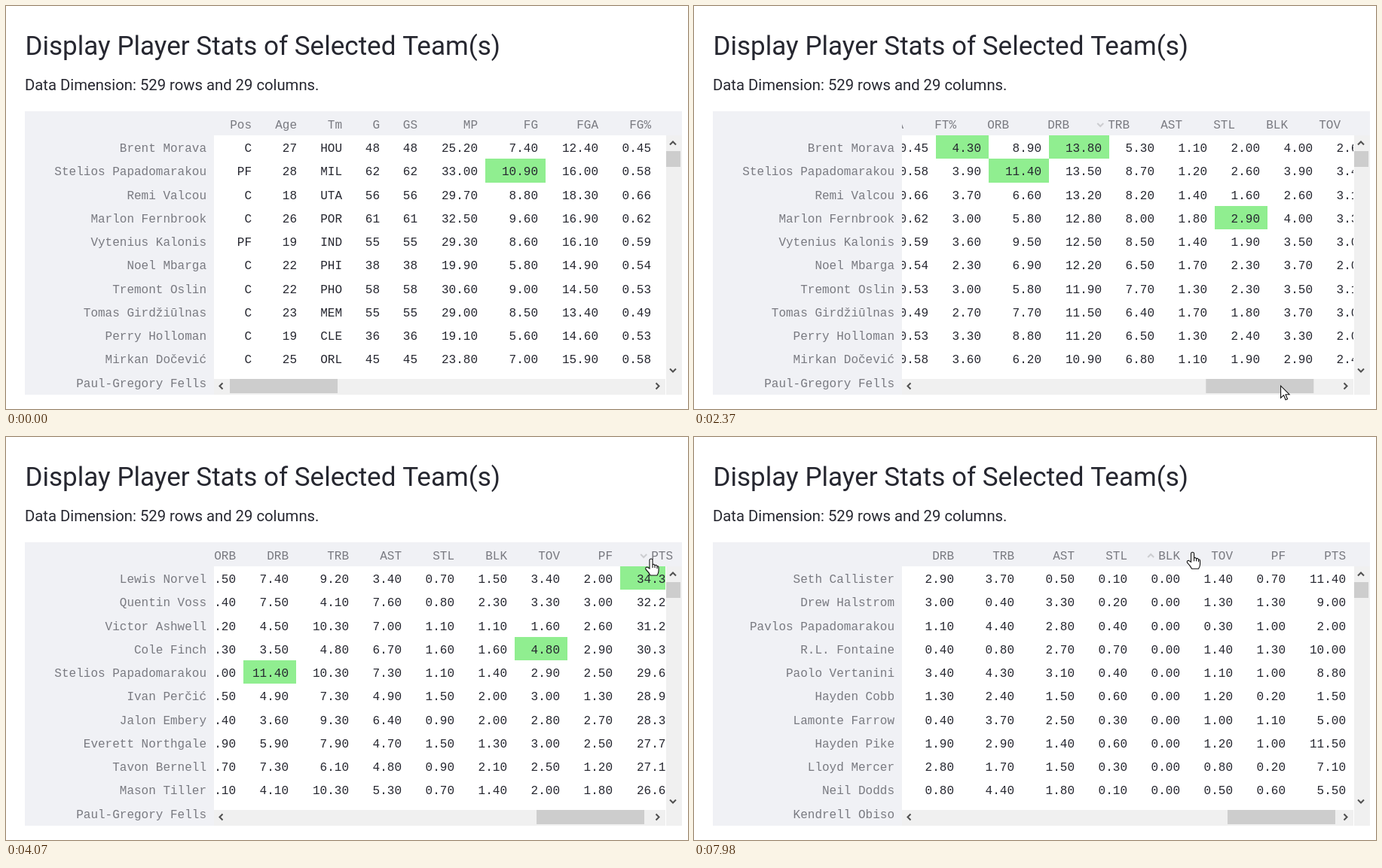
Animation of 905 by 536 pixels, one loop 8000 ms. Source, as an HTML page with a canvas:

```html
<!DOCTYPE html>
<html lang="en">
<head>
<meta charset="utf-8">
<title>Player stats</title>
<style>
html, body { margin: 0; width: 100%; height: 100%; overflow: hidden; background: #fff; }
canvas { display: block; }
</style>
</head>
<body>
<canvas id="stage" width="905" height="536"></canvas>
<script>
const ctx = document.getElementById('stage').getContext('2d');
const LOOP = 8000, LEFT = 276, TOP = 172, ROW = 31.25, ROWS = 10, MAX_SCROLL = 1391;
const MONO = '16px "Liberation Mono", monospace';
const SANS = 'Roboto, sans-serif';
const INK = '#262730', MUTED = '#797a81', PANEL = '#f0f1f5', BAR = '#f0f0f0', THUMB = '#cdcdcd', GREEN = '#90ee90';

const noise = n => Math.abs(Math.sin(n * 12.9898) * 43758.5453) % 1;

// League best per column; the percentages share one value
const best = {
  Age: 33, G: 70, GS: 70, MP: 37, FG: 10.9, FGA: 22, '3P': 4, '3PA': 9, '2P': 9, '2PA': 17, FT: 9, FTA: 11,
  ORB: 4.3, DRB: 11.4, TRB: 13.8, AST: 10, STL: 2, BLK: 2.9, TOV: 4.8, PF: 3.8, PTS: 34.3
};
const labels = {
  Pos: 'C PF C C PF C C C C C'.split(' '),
  Tm: 'HOU MIL UTA POR IND PHI PHO MEM CLE ORL'.split(' ')
};

function format(name, share) {
  if (name.endsWith('%')) return (share * .8).toFixed(2);
  const value = best[name] * share;
  return /^(Age|G|GS)$/.test(name) ? value.toFixed(0) : value.toFixed(1) + '0';
}

function columnWidth(name, wide) {
  if (/^(Pos|Age|Tm)$/.test(name)) return 60;
  if (/^GS?$/.test(name)) return 50;
  return wide.split(' ').includes(name) ? 80 : 70;
}

// low..high: usual share of the league best; from..to: shares of the sorted column;
// peaks: the row in which a column holds the league best
function table({ start, cols, wide, sortBy, dir, low, high, from, to, bend = 1, peaks = {}, names }) {
  let right = start;
  return {
    sortBy, dir, names: names.split(','),
    cols: cols.split(' ').map(name => {
      const width = columnWidth(name, wide);
      right += width;
      const cells = Array.from({ length: ROWS }, (_, r) => {
        if (labels[name]) return labels[name][r];
        if (peaks[name] === r) return format(name, 1);
        if (name === sortBy) return format(name, from + (to - from) * (r / (ROWS - 1)) ** bend);
        return format(name, low + (high - low) * noise(r * 31 + name.charCodeAt(0) + name.charCodeAt(2) % 7 * 3 || r * 31 + 5));
      });
      return { name, right, width, cells, peak: peaks[name] };
    })
  };
}

const LATE = 'DRB TRB AST STL BLK TOV PF PTS';

const byRebounds = table({
  start: LEFT, wide: 'MP FG FGA 3PA 2PA FT FTA DRB TRB PTS', sortBy: 'TRB', dir: 1,
  cols: 'Pos Age Tm G GS MP FG FGA FG% 3P 3PA 3P% 2P 2PA 2P% eFG% FT FTA FT% ORB ' + LATE,
  low: .5, high: .9, from: 1, to: .79, peaks: { FG: 1, ORB: 0, DRB: 1, TRB: 0, BLK: 3 },
  names: 'Brent Morava,Stelios Papadomarakou,Remi Valcou,Marlon Fernbrook,Vytenius Kalonis,Noel Mbarga,' +
    'Tremont Oslin,Tomas Girdžiūlnas,Perry Holloman,Mirkan Dočević,Paul-Gregory Fells'
});

const pointsUp = table({
  start: 285, cols: LATE, wide: 'DRB TRB PTS', sortBy: 'PTS', dir: -1,
  low: 0, high: .12, from: 0, to: .02, bend: 3,
  names: 'Lamonte Farrow,Caleb Orton,Raymond Tisdel,Clayton Rudd,T.R. Dalena,Elijah Munn,' +
    'Oscar Jorgelin,Sam Brindle,Kurt Feeley,Devon Cutler,Rohan Whitlocke'
});

const pointsDown = table({
  start: 245, cols: 'ORB ' + LATE, wide: 'TRB PTS', sortBy: 'PTS', dir: 1,
  low: .3, high: .8, from: 1, to: .776, bend: .6, peaks: { DRB: 4, TOV: 3, PTS: 0 },
  names: 'Lewis Norvel,Quentin Voss,Victor Ashwell,Cole Finch,Stelios Papadomarakou,Ivan Perčić,' +
    'Jalon Embery,Everett Northgale,Tavon Bernell,Mason Tiller,Paul-Gregory Fells'
});

const byBlocks = table({
  start: 285, cols: LATE, wide: 'TRB AST PTS', sortBy: 'BLK', dir: -1,
  low: .03, high: .35, from: 0, to: 0,
  names: 'Seth Callister,Drew Halstrom,Pavlos Papadomarakou,R.L. Fontaine,Paolo Vertanini,Hayden Cobb,' +
    'Lamonte Farrow,Hayden Pike,Lloyd Mercer,Neil Dodds,Kendrell Obiso'
});

// Pointer path: time x y
const path = (
  '0 703 540, 130 703 540, 200 703 527, 400 703 527, 740 809 501, 940 809 501, 1420 667 507, 1620 667 507, ' +
  '1780 775 507, 2440 779 505, 2800 845 400, 3050 862 122, 3390 856 162, 4270 856 162, 4520 790 426, ' +
  '4780 657 300, 5040 741 122, 5180 569 145, 5870 461 150, 6200 330 232, 6500 221 191, 6700 326 194, ' +
  '7510 717 163, 7700 640 156, 8000 663 153'
).split(', ').map(k => k.split(' ').map(Number));

// Mouse button held down
const clicks = [[1750, 2250], [3390, 3450], [3840, 3940], [7700, 7780]];

const arrow = new Path2D('M0 0V16L4 12.5L6.5 18.5L9 17.5L6.5 11.5H11.5Z');
const hand = new Path2D('M-2 13V2Q-2 0 0 0T2 2V8Q4 6 5 9Q7 7 8 10Q10 9 10 12V16Q10 19 8 22H-1Q-3 18 -7 14Q-8 11 -5 11Z' +
  'M2 8V12M5 9V12M8 10V13');

function pointerAt(t) {
  const i = path.findIndex(k => k[0] > t);
  const [t0, x0, y0] = path[i - 1], [t1, x1, y1] = path[i];
  const p = (t - t0) / (t1 - t0);
  return [x0 + (x1 - x0) * p, y0 + (y1 - y0) * p];
}

// The fast scroll is shown in steps of 70 ms; headers trail the cells
function scrollAt(t, lag = 0) {
  const step = Math.floor((t - 59) / 70) * 70 + 60;
  return Math.min(MAX_SCROLL, Math.max(0, (step - lag - 1850) * 1285 / 520));
}

// Table, horizontal shift of cells and headers, and scroll thumb position
function viewAt(t) {
  if (t < 3450) {
    const s = scrollAt(t);
    return [byRebounds, -s, -scrollAt(t, 15), 297 + s / 3.361];
  }
  if (t < 4000) return [pointsUp, 0, 0, 711];
  if (t < 4070) return [pointsDown, -20, -20, 711];
  if (t < 7790) return [pointsDown, 0, 0, 704];
  return [byBlocks, 0, 0, 708];
}

function box(color, x, y, w, h) {
  ctx.fillStyle = color;
  ctx.fillRect(x, y, w, h);
}

function text(str, x, y, color, font, align) {
  ctx.font = font;
  ctx.fillStyle = color;
  ctx.textAlign = align;
  ctx.fillText(str, x, y);
}

function clipped(x, y, w, h, draw) {
  ctx.save();
  ctx.beginPath();
  ctx.rect(x, y, w, h);
  ctx.clip();
  draw();
  ctx.restore();
}

// Chevron pointing along (dx, dy)
function chevron(x, y, dx, dy, color) {
  ctx.beginPath();
  ctx.moveTo(x - 2 * dx - 4 * dy, y - 2 * dy - 4 * dx);
  ctx.lineTo(x + 2 * dx, y + 2 * dy);
  ctx.lineTo(x - 2 * dx + 4 * dy, y - 2 * dy + 4 * dx);
  ctx.strokeStyle = color;
  ctx.lineWidth = 2;
  ctx.stroke();
}

function drawTable([data, shift, headShift, thumb]) {
  const rowTop = r => Math.round(TOP + ROW * r);
  box(PANEL, 25, 140, 872, 32);
  box(PANEL, 25, 140, 251, 377);

  data.names.forEach((n, r) => text(n, 266, rowTop(r) + 22, MUTED, MONO, 'right'));

  clipped(LEFT, 140, 621, 32, () => data.cols.forEach(c => {
    const x = c.right - 10 + headShift;
    text(c.name, x, 163, MUTED, MONO, 'right');
    if (c.name === data.sortBy) chevron(x - c.name.length * 9.6 - 10, 158, 0, data.dir, '#cccdd0');
  }));

  clipped(LEFT, TOP, 599, 324, () => data.cols.forEach(c => c.cells.forEach((v, r) => {
    const x = c.right + shift, y = rowTop(r);
    if (c.peak === r) box(GREEN, x - c.width, y, c.width, rowTop(r + 1) - y);
    text(v, x - 10, y + 22, INK, MONO, 'right');
  })));

  box(BAR, 876, TOP, 21, 345);
  box(THUMB, 876, 193, 19, 21);
  box(BAR, LEFT, 496, 599, 21);
  box(THUMB, thumb, 496, 143, 19);
  chevron(885, 182.5, 0, -1, '#505050');
  chevron(885, 484.5, 0, 1, '#505050');
  chevron(285.5, 505.5, -1, 0, '#505050');
  chevron(864.5, 505.5, 1, 0, '#505050');
}

function drawPointer(t) {
  const [x, y] = pointerAt(t);
  if (clicks.some(([a, b]) => t >= a && t < b)) {
    ctx.beginPath();
    ctx.arc(x, y, 15, 0, 7);
    ctx.fillStyle = 'rgba(255, 246, 60, .75)';
    ctx.fill();
  }
  const shape = x > LEFT && y > 140 && y < TOP ? hand : arrow;
  ctx.save();
  ctx.translate(x, y);
  ctx.fillStyle = '#fff';
  ctx.strokeStyle = '#111';
  ctx.lineWidth = 1.1;
  ctx.fill(shape);
  ctx.stroke(shape);
  ctx.restore();
}

function frame(now) {
  const t = now % LOOP;
  box('#fff', 0, 0, 905, 536);
  text('Display Player Stats of Selected Team(s)', 25.5, 65, INK, '35.05px ' + SANS, 'left');
  text('Data Dimension: 529 rows and 29 columns.', 25, 112, INK, '20.25px ' + SANS, 'left');
  drawTable(viewAt(t));
  drawPointer(t);
}

const begin = performance.now();
(function tick() {
  frame(performance.now() - begin);
  requestAnimationFrame(tick);
})();
</script>
</body>
</html>
```
